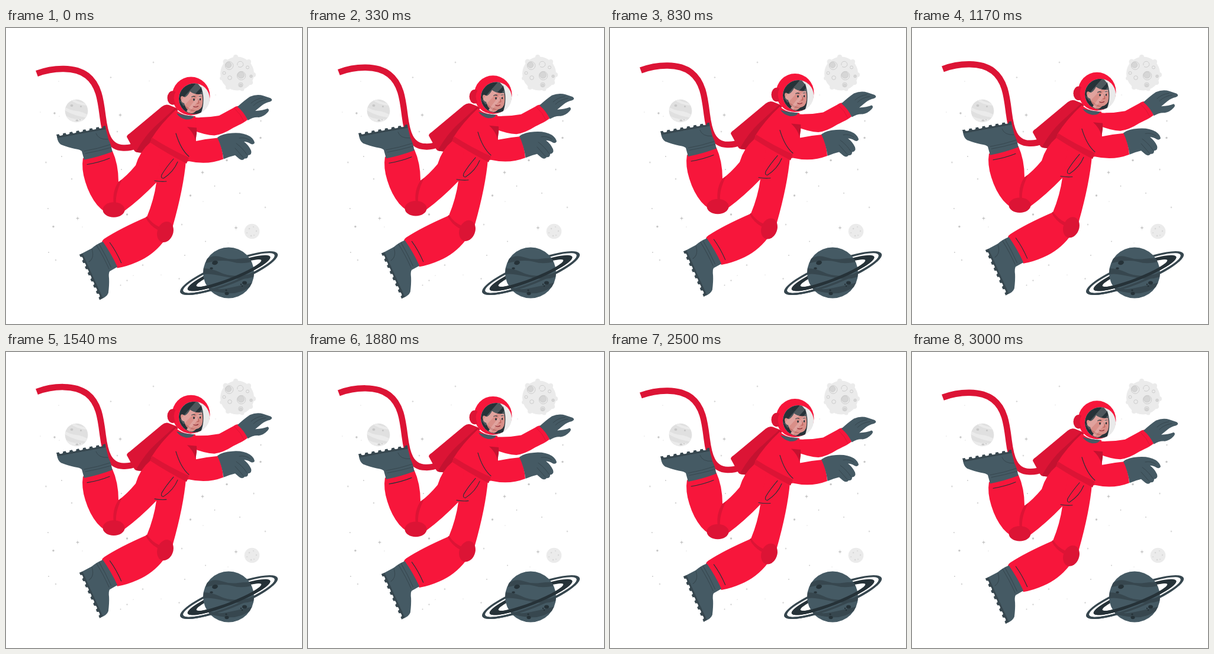
Recreate the animation shown at these times as an HTML page. Size 500 px wide and 500 px high, loop 3.04 s.

```html
<!DOCTYPE html>
<html lang="en">
<head>
<meta charset="utf-8">
<title>Floating astronaut</title>
<style>
html, body { margin: 0; width: 100%; height: 100%; overflow: hidden; background: #fff; }
svg { display: block; width: 100%; height: 100%; }
.red { fill: #f7163b; }
.deep { fill: #dc1435; }
.shade { fill: #c41230; }
.slate { fill: #455a64; }
.dusk { fill: #37474f; }
.ink { fill: #263238; }
.pale { fill: #ebebeb; }
.grey { fill: #e0e0e0; }
.star { fill: #c7c7c7; }
.line { fill: none; stroke: #263238; stroke-width: 1.1; stroke-linecap: round; }
.seam { fill: none; stroke: #37474f; stroke-width: 1; stroke-linecap: round; }
.crater { fill: #d6d6d6; stroke: #c9c9c9; stroke-width: .8; }
.rim { fill: none; stroke: #c9c9c9; stroke-width: .9; }
</style>
</head>
<body>
<svg viewBox="0 0 500 500">
  <defs>
    <clipPath id="globe"><circle cx="376" cy="413.5" r="43"/></clipPath>
    <clipPath id="front"><path d="M-95 0H95V30H-95Z"/></clipPath>
    <clipPath id="small"><circle cx="119" cy="140" r="19.3"/></clipPath>
    <clipPath id="visor"><ellipse cx="318" cy="119.5" rx="26" ry="26"/></clipPath>
    <g id="rings" fill-rule="evenodd">
      <path class="dusk" d="M-88.4 0a88.4 19 0 0 1 176.8 0a88.4 19 0 0 1-176.8 0M-83 0a83 15.5 0 0 0 166 0a83 15.5 0 0 0-166 0"/>
      <path class="ink" d="M-75 0a75 13.5 0 0 1 150 0a75 13.5 0 0 1-150 0M-59 0a59 8.5 0 0 0 118 0a59 8.5 0 0 0-118 0"/>
    </g>
    <g id="boot">
      <path class="slate" d="M86 183Q87 193 93 197Q106 202 116 204Q125 205 128 208L132 222.500Q156 218 179.500 209Q178 198 173 188L168 168Z"/>
      <path class="dusk" id="sole"/>
      <path class="seam" d="M152 178Q156 189 172 188M132 208Q155 204 176 197M134 212Q156 208 177 202"/>
      <path class="line" d="M137 230.500Q158 227 175 220"/>
    </g>
  </defs>

  <g id="stars" class="star"></g>

  <!-- cratered moon -->
  <g>
    <g class="pale">
      <circle cx="390.500" cy="77" r="28.500"/>
      <circle cx="388" cy="49" r="4"/><circle cx="371" cy="57" r="4.500"/>
      <circle cx="410" cy="57" r="4"/><circle cx="418" cy="79" r="4"/>
      <circle cx="413" cy="92" r="4"/><circle cx="399" cy="103" r="3.500"/>
      <circle cx="375" cy="100" r="4"/><circle cx="364" cy="85" r="3"/>
    </g>
    <circle class="rim" cx="377" cy="63.500" r="6.800"/><circle class="crater" cx="376" cy="62.500" r="4.800"/>
    <circle class="rim" cx="397.500" cy="80.500" r="7.200"/><circle class="crater" cx="397" cy="79.500" r="5.500"/>
    <path class="rim" d="M391 63a5 5 0 1 1 9 1M392 65q4 3 8-1"/>
    <circle class="rim" cx="378" cy="84" r="3.300"/><circle class="rim" cx="368.500" cy="76" r="2.500"/>
    <circle class="rim" cx="408" cy="66.500" r="2.500"/>
    <circle class="rim" cx="396.500" cy="96" r="3.800"/><circle class="crater" cx="396.500" cy="96.500" r="2.300"/>
    <circle class="crater" cx="414" cy="81.500" r="2.300"/>
  </g>

  <!-- striped planet -->
  <g clip-path="url(#small)">
    <path class="grey" d="M99 120h40v40H99z"/>
    <path class="pale" d="M99 133Q108 139 118 140T139 147V152Q126 150 117 147T99 139ZM99 147Q110 154 122 154T139 157V160Q125 159 115 158T99 152ZM108 121Q120 130 136 131V127Q122 126 113 119Z"/>
    <g class="star"><ellipse cx="111" cy="131" rx="2.500" ry="2"/><circle cx="126.500" cy="132.500" r="1.500"/><ellipse cx="120" cy="156" rx="2.500" ry="1.500"/><circle cx="125" cy="155" r="1"/></g>
  </g>

  <!-- small moon -->
  <circle class="pale" cx="415.500" cy="343.500" r="12.800"/>
  <g fill="#d8d8d8"><circle cx="411" cy="339" r="1.300"/><circle cx="418" cy="336" r="1"/><circle cx="423" cy="343" r="1.300"/><circle cx="414" cy="351" r="1.300"/><circle cx="407" cy="346" r="1"/><circle cx="419" cy="350" r="1"/></g>

  <!-- ringed planet -->
  <use href="#rings" transform="translate(376.500 414) rotate(-21.600)"/>
  <g clip-path="url(#globe)">
    <path class="slate" d="M330 368h92v92h-92z"/>
    <path class="dusk" d="M338 391Q350 382 364 387T392 390T418 389V394Q398 400 382 395T338 397ZM332 406Q348 406 362 413T396 418T420 412V420Q403 426 386 423T354 417T332 417ZM336 434Q352 444 372 440T417 430L413 437Q394 450 374 448T340 442Z"/>
    <g class="ink"><ellipse cx="353" cy="396.500" rx="5" ry="3.500" transform="rotate(-15 353 396.500)"/><ellipse cx="347" cy="406" rx="2.800" ry="1.800"/><ellipse cx="403" cy="430.500" rx="4" ry="3"/><ellipse cx="373" cy="448.500" rx="3.500" ry="2.800"/><circle cx="372" cy="443" r="1.600"/><circle cx="397" cy="433" r="1.200"/><circle cx="399" cy="436" r="1.200"/></g>
  </g>
  <g transform="translate(376.500 414) rotate(-21.600)"><use href="#rings" clip-path="url(#front)"/></g>

  <g id="astronaut">
    <!-- hose and backpack -->
    <path d="M52 77C80 66.500 117 65 137 80.500C157 96 160 122 163.500 150C167 178 173 202 198 202.500Q210 203 218 199" fill="none" stroke="#dc1435" stroke-width="10.500"/>
    <path class="deep" d="M204 184Q204 181 209 178L263 133Q269 128 275 130L290 136L246 190L240 212L222 210Q218 210 216 206Z"/>
    <path class="shade" d="M285 136L291 138L247 188L239 212L222 210Q219 209 221 206Q235 182 252 166Z"/>

    <!-- far arm -->
    <path class="red" d="M310 148Q318 152 328 151Q344 151 360 148L384 135Q390 131 394 132Q404 142 408 155Q404 159 384 168.500Q366 180 352 181.500Q336 181 314 172Z"/>
    <path class="slate" d="M391 133Q403 122 412 116Q424 111 435 114.500L447 118.500Q452 122 446 124.500Q438 126 432 131L421 140Q434 139.500 442 136Q446 138 442 142.500Q435 150 427 151Q418 150 408.500 156Q402 142 391 133Z"/>
    <path class="seam" d="M414 127Q423 119 434 118M418 131Q426 123 439 121"/>
    <path fill="none" stroke="#dc1435" d="M386 136Q397 146 402 158"/>

    <!-- legs -->
    <path class="red" d="M244 193Q226 208 219 232Q204 250 190 260Q190 230 179.500 207L130 220Q127 238 134 260Q141 283 154 299Q160 306 168 311Q184 320 200 309Q226 290 254 261L300 222L270 190Z"/>
    <path class="deep" d="M190 260Q179 276 182 298H186Q184 280 196 256Z"/>
    <ellipse class="deep" cx="182" cy="307" rx="18.500" ry="12.800"/>
    <path class="red" d="M265 200L304 224Q300 270 282 334Q282 350 266 361Q248 384 222 395Q204 403 188 405.500L162 361Q163 358 166 356Q192 339 238 319Q250 290 254 261Z"/>
    <path class="deep" d="M238 318Q247 331 259 336L256 341Q242 333 236 320Z"/>
    <ellipse class="deep" cx="269" cy="344.500" rx="13.300" ry="18" transform="rotate(20 269 344.500)"/>
    <path class="line" d="M283 221Q270 236 263 248Q261 254 266 254Q283 243 290 226M251 258Q262 260 271 259"/>
    <use href="#boot"/>
    <use href="#boot" transform="translate(158.300 459.500) rotate(-104) translate(-85 -180)"/>

    <!-- torso and near arm -->
    <path class="red" d="M287 138Q298 149 320 149L321 191Q340 187 358 185.500Q366 203 367 221.500Q340 232 309 225L303 226L245 188Q261 162 287 138Z"/>
    <path class="shade" d="M306 167L322 168.500Q323 180 320 189Q317 177 306 167Z"/>
    <path class="deep" d="M247 185.500Q276 204 309 219L305 229Q272 212 243 193Z"/>
    <path class="line" d="M287 178Q295 205 309 217"/>
    <path class="slate" d="M357 185Q366 178 382 177.500Q400 176 412 183Q419 188 420 194Q418 198 413 195.500Q408 192 402 192Q410 198 414 207Q416 214 409 215Q409 221 403 220.500Q400 225 394 221L387 215Q378 217 367.500 221.500Q365 202 357 185Z"/>
    <path class="seam" d="M389 195Q400 203 407 214M387 203Q394 211 401 219M394 186Q404 184 412 190"/>

    <!-- helmet -->
    <path class="slate" d="M288 144Q302 148 318 149Q315 155 304 154.500Q293 152 288 144Z"/>
    <ellipse class="red" cx="312.500" cy="115" rx="32" ry="32.500"/>
    <ellipse class="deep" cx="281.500" cy="118" rx="9" ry="11.800"/>
    <path class="red" d="M287 107Q280 117 287 130L296 130V107Z"/>
    <g clip-path="url(#visor)">
      <path class="grey" d="M290 92h58v58h-58z"/>
      <path class="ink" d="M288 92H322Q333 102 333 114Q335 132 328 147H288Z"/>
      <path fill="#d98f88" d="M300 116Q295 113 295 119Q296 126 301 127Q303 135 307 138L305 141Q314 148 321 140Q331 138 332 128Q333 118 331 111Q318 113 311 107Q307 115 302 117Z"/>
      <path fill="#c3756f" d="M303 131Q304 136 307 138Q313 142 321 140Q310 137 303 131Z"/>
      <path class="ink" d="M310 106Q317 113 332 112L330 100L318 96Z"/>
      <path class="line" d="M313.500 116.500Q316 114.500 319.500 116M326 115.500L330 115"/>
      <ellipse class="ink" cx="317.500" cy="121" rx="1.400" ry="2"/>
      <ellipse class="ink" cx="328" cy="120.500" rx="1.200" ry="1.900"/>
      <path d="M324 119L326 127L322.500 127.500" fill="none" stroke="#b25650"/>
      <path d="M316 132Q320 135 325 132" fill="none" stroke="#8f2f38" stroke-width="1.200"/>
      <path fill="#fff" opacity=".18" d="M324 90L334 96L300 132L294 124ZM337 99L341 102L309 143L305 140Z"/>
      <path fill="#fff" opacity=".3" d="M329 94Q338 118 331 146L348 140V96Z"/>
    </g>
  </g>
</svg>
<script>
const $ = id => document.getElementById(id);
const LOOP = 3040, RISE = 10;

// Sparkles: four thin points, each side pulled in to the centre
const sparkle = (r, x, y) => {
  const side = (px, py) => `C${x} ${y} ${x} ${y} ${px} ${py}`;
  return `<path d="M${x} ${y - r}${side(x + r, y)}${side(x, y + r)}${side(x - r, y)}${side(x, y - r)}"/>`;
};
const dot = (r, x, y) => `<circle cx="${x}" cy="${y}" r="${r}"/>`;
const scatter = (draw, r, places) =>
  places.split(' ').map(p => draw(r, ...p.split(',').map(Number))).join('');

$('stars').innerHTML =
  scatter(sparkle, 7.5, '193,147 332,244 121,321.5 388.5,337.5') +
  scatter(sparkle, 4.5, '249,58 177,83.5 188,175 67.5,227 111,255 84,392 231,400.5 204.500,426.500 292.500,423.500 297,332 438,303 418.500,239 430.500,157') +
  scatter(dot, 1.7, '82,144 430,185.5 373,223.5 311.500,283 80,335.5 204.500,315') +
  scatter(dot, .9, '94,217 195,239 71,305 72,379 193.500,434.500 302,384 337,360.500 395,279 352.500,267') +
  scatter(dot, .6, '129,336 215,418 262,417 375,363 333,293 89,90 58,142 242,89.5 354,113 90,149');

// Scalloped tread along the sole
$('sole').setAttribute('d',
  'M85 180' + 'l4.5-.8a3.4 3.4 0 0 0 6.700-1.200'.repeat(7) + 'l4.500-.8L168.500 171Q128 178 87 186Z');

function frame(now) {
  const phase = now % LOOP / LOOP;
  const lift = RISE * (1 - Math.abs(1 - 2 * phase));
  $('astronaut').setAttribute('transform', `translate(0 ${-lift})`);
  requestAnimationFrame(frame);
}
requestAnimationFrame(frame);
</script>
</body>
</html>
```
